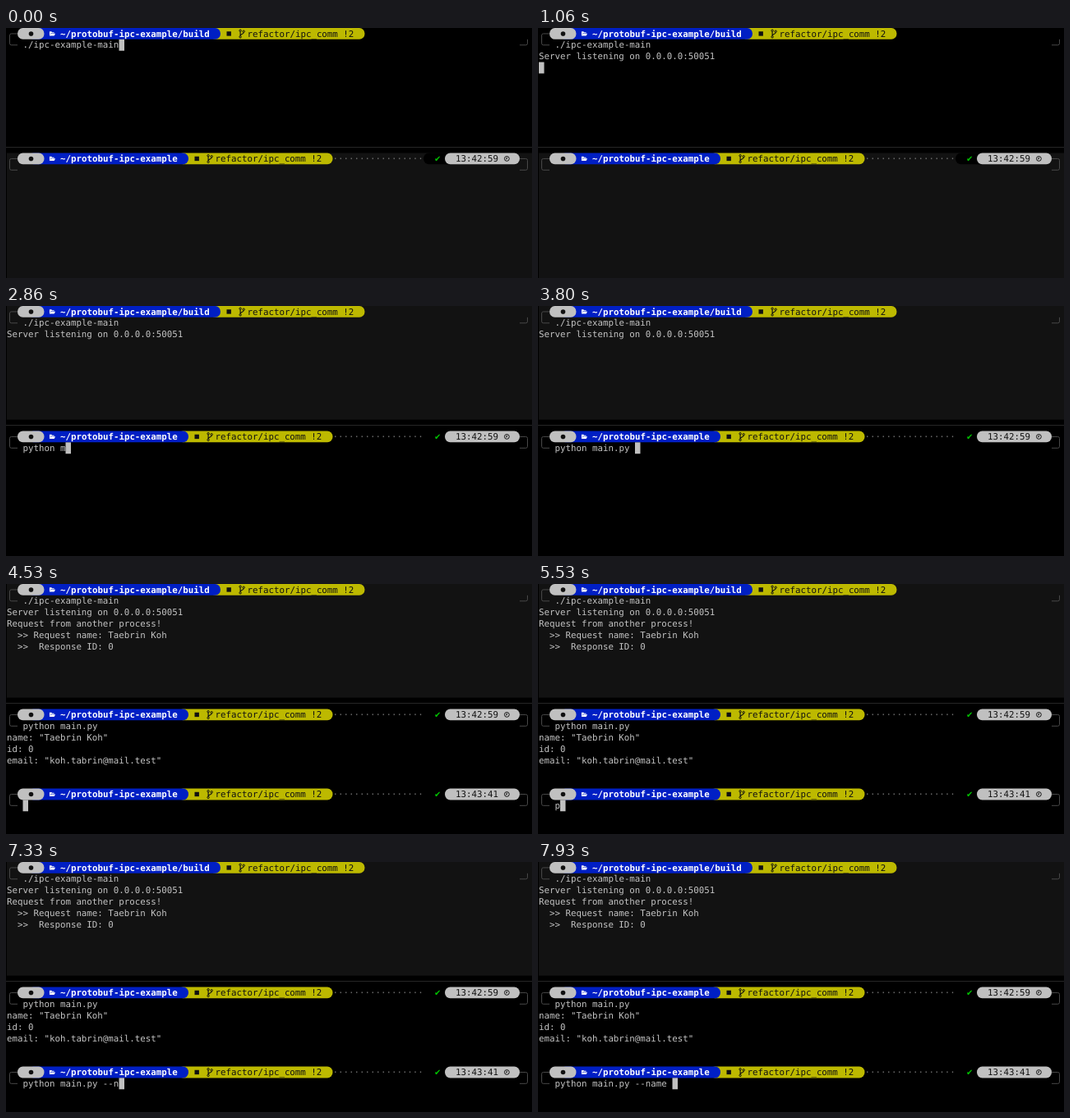
An HTML page that plays this animation: 640x305 px, repeating every 8 s.

```html
<!DOCTYPE html>
<html lang="en">
<head>
<meta charset="utf-8">
<title>Two terminal panes</title>
<style>
  html, body { margin: 0; width: 100%; height: 100%; overflow: hidden; background: #000; }
  svg { display: block; width: 640px; height: 305px; }
  text {
    font-family: "DejaVu Sans Mono", "Noto Sans Mono", monospace;
    font-size: 10.797px; white-space: pre; text-rendering: geometricPrecision;
  }
</style>
</head>
<body>
<svg id="stage" viewBox="0 0 640 305"></svg>
<script>
const LOOP = 8000;
const LEFT = 1, CELL = 6.5, ROW = 305 / 22;
const GRAY = '#c0c0c0', INK = '#111', TEXT = '#c4c4c4';
const BLUE = '#001fc4', YELLOW = '#bdb900', FRAME = '#484848';

const stage = document.getElementById('stage');
const x = col => LEFT + col * CELL;
const y = row => row * ROW;

function add(parent, tag, attrs, content = '') {
  const node = document.createElementNS('http://www.w3.org/2000/svg', tag);
  for (const key in attrs) node.setAttribute(key, attrs[key]);
  node.textContent = content;
  return parent.appendChild(node);
}

const label = (parent, col, row, content, fill = TEXT, extra = {}) =>
  add(parent, 'text', { x: x(col), y: y(row) + 10.6, fill, ...extra }, content);

const pill = (parent, from, to, row, fill) =>
  add(parent, 'rect', { x: x(from), y: y(row), width: (to - from) * CELL, height: ROW,
    rx: CELL, ry: ROW / 2, fill });

const line = (parent, d, stroke, width = 1) =>
  add(parent, 'path', { d, stroke, 'stroke-width': width, fill: 'none' });

const dot = (parent, cx, cy, r, attrs) => add(parent, 'circle', { cx, cy, r, ...attrs });

function folder(parent, cx, cy) {
  add(parent, 'path', { fill: '#fff', transform: `translate(${cx} ${cy})`,
    d: 'M-3.3 2.6V-2.6H-.9L-.1-1.7H2.3V-.8H-1.5L-2.8 1.8L-1.1-.1H3.8L2.4 2.6Z' });
}

function branch(parent, cx, cy) {
  const g = add(parent, 'g', { transform: `translate(${cx} ${cy})` });
  line(g, 'M-1.9-2.6V2.8M2.2-1.6C2.2 1-1.9.2-1.9 2.6', INK, 1.1);
  for (const [px, py] of [[-1.9, -3.7], [-1.9, 3.9], [2.2, -2.7]])
    dot(g, px, py, 1.2, { fill: 'none', stroke: INK });
}

function clock(parent, cx, cy) {
  dot(parent, cx, cy, 2.9, { fill: 'none', stroke: INK });
  line(parent, `M${cx} ${cy - 1.8}V${cy + .3}H${cx - 1.4}`, INK, .9);
}

// Two-row prompt; the right-hand status only shows when a time is given.
function prompt(row, path, time) {
  const g = add(stage, 'g', {});
  const mid = y(row) + ROW / 2, low = mid + ROW;
  const blueEnd = 12 + path.length, yellowEnd = blueEnd + 27;

  line(g, `M${x(2)} ${mid}H6.5Q4.5 ${mid} 4.5 ${mid + 2}V${low - 2}Q4.5 ${low} 6.5 ${low}H${x(2)}`, FRAME);
  const corner = time ? `M${x(96)} ${mid}H632.5Q634.5 ${mid} 634.5 ${mid + 2}` : `M634.5 ${y(row + 1)}`;
  line(g, `${corner}V${low - 2}Q634.5 ${low} 632.5 ${low}H${x(96)}`, FRAME);

  pill(g, blueEnd - 2, yellowEnd, row, YELLOW);
  pill(g, 4, blueEnd, row, BLUE);
  pill(g, 2, 7, row, GRAY);
  dot(g, 30.5, mid, 2.8, { fill: INK });
  folder(g, x(8.5), mid);
  label(g, 10, row, path, '#fff', { 'font-weight': 'bold' });
  add(g, 'rect', { x: x(blueEnd + 1) + 1, y: mid - 2.7, width: 5.4, height: 5.4, fill: INK });
  branch(g, x(blueEnd + 4), mid);
  label(g, blueEnd + 5, row, 'refactor/ipc_comm !2', INK);

  if (time) {
    label(g, yellowEnd, row, '·'.repeat(17), '#707070');
    pill(g, 78, 84, row, '#000');
    label(g, 80, row, '✔', '#00c200', { style: 'font-family: "DejaVu Sans", sans-serif; font-size: 10px' });
    pill(g, 82, 96, row, GRAY);
    label(g, 84, row, time, INK);
    clock(g, x(93.6), mid);
  }
  return g;
}

function output(row, lines) {
  const g = add(stage, 'g', {});
  lines.forEach((content, i) => label(g, 0, row + i, content));
  return g;
}

const shade = add(stage, 'rect', { x: 1, width: 639, fill: '#121212' });
line(stage, 'M0 145.5H640', '#262626');

prompt(0, '~/protobuf-ipc-example/build');
label(stage, 3, 1, './ipc-example-main');
prompt(11, '~/protobuf-ipc-example', '13:42:59');

const reveals = [
  [530, output(2, ['Server listening on 0.0.0.0:50051'])],
  [4460, output(3, ['Request from another process!', '  >> Request name: Taebrin Koh', '  >>  Response ID: 0'])],
  [4460, output(13, ['name: "Taebrin Koh"', 'id: 0', 'email: "koh.tabrin@mail.test"'])],
  [4530, prompt(18, '~/protobuf-ipc-example', '13:43:41')],
];

// Each key press: [time, characters it adds].
const typing = [
  { row: 12, keys: [[1860, 'p'], [2200, 'y'], [2260, 't'], [2330, 'h'], [2460, 'o'], [2600, 'n'], [2660, ' '],
    [2800, 'm'], [3000, 'a'], [3130, 'i'], [3260, 'n'], [3600, '.py ']] },
  { row: 19, keys: [[5200, 'p'], [5540, 'y'], [5600, 't'], [5670, 'h'], [5800, 'o'], [5930, 'n'], [6000, ' '],
    [6130, 'm'], [6260, 'a'], [6330, 'i'], [6400, 'n'], [6530, '.py '],
    [7000, '-'], [7130, '-'], [7330, 'n'], [7400, 'a'], [7530, 'm'], [7600, 'e'], [7730, ' ']] },
];
for (const entry of typing) entry.node = label(stage, 3, entry.row, '');

const cursor = add(stage, 'rect', { width: CELL, height: ROW, fill: GRAY });

const typed = (keys, t) => keys.filter(([at]) => at <= t).map(([, chars]) => chars).join('');

function cursorCell(t, lengths) {
  if (t < 530) return [21, 1];
  if (t < 1460) return [0, 3];
  if (t < 4330) return [3 + lengths[0], 12];
  if (t < 4460) return [0, 13];
  if (t < 4530) return [0, 16];
  return [3 + lengths[1], 19];
}

function draw(t) {
  const lowerActive = t >= 1460;
  shade.setAttribute('y', lowerActive ? 0 : y(11));
  shade.setAttribute('height', y(lowerActive ? 10 : 11));

  for (const [at, node] of reveals) node.setAttribute('visibility', t >= at ? 'visible' : 'hidden');

  const lengths = typing.map(({ keys, node }) => {
    const content = typed(keys, t);
    if (node.textContent !== content) node.textContent = content;
    return content.length;
  });

  const [col, row] = cursorCell(t, lengths);
  cursor.setAttribute('x', x(col));
  cursor.setAttribute('y', y(row));
}

const start = performance.now();
function tick(now) {
  draw(Math.max(0, now - start) % LOOP);
  requestAnimationFrame(tick);
}
draw(0);
requestAnimationFrame(tick);
</script>
</body>
</html>
```
